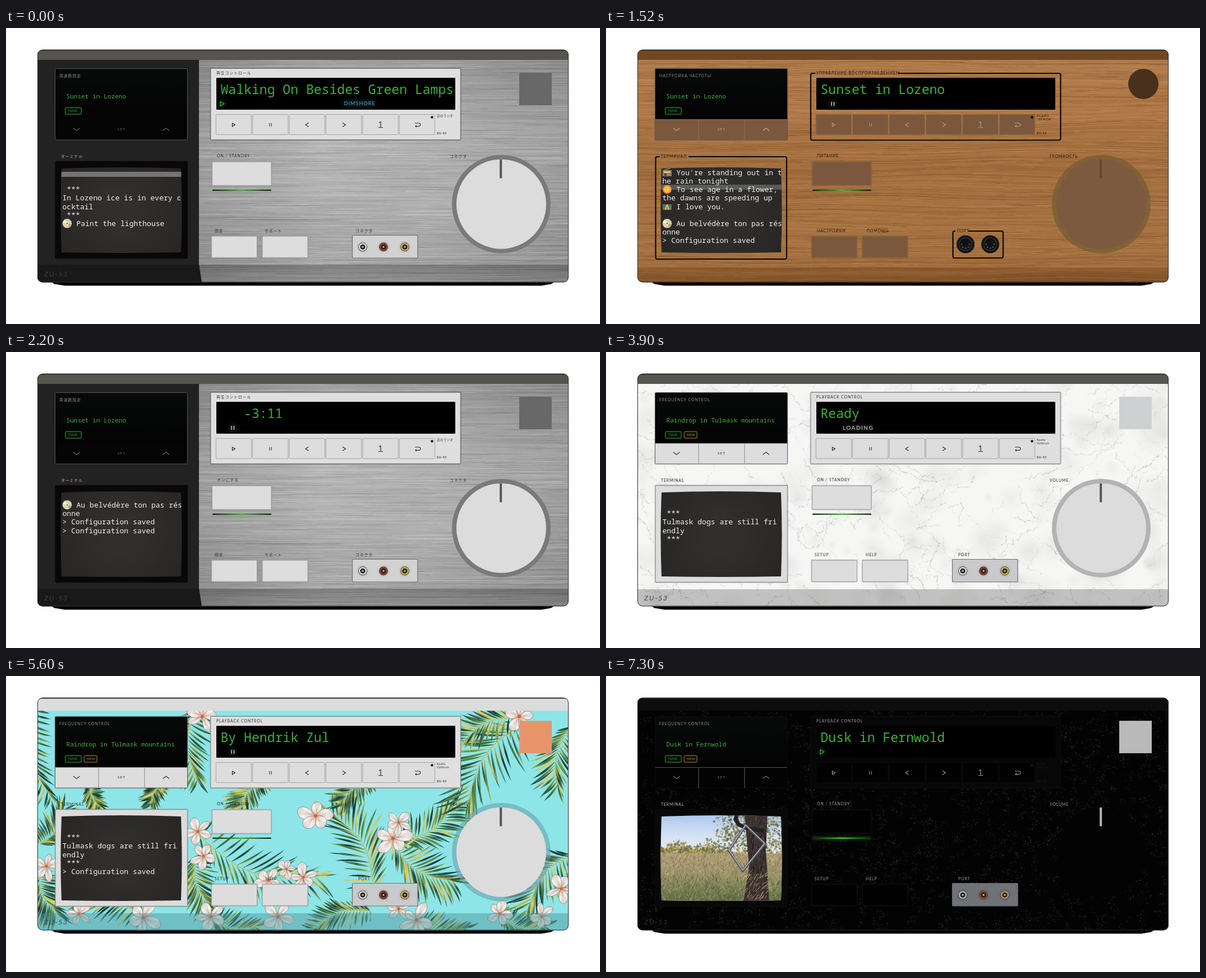
Animation, 1059 px wide and 529 px high, one loop 8000 ms. Source, as an HTML page with a canvas:

```html
<!DOCTYPE html>
<html lang="en">
<head>
<meta charset="utf-8">
<title>Radio skins</title>
<style>
html, body { margin: 0; width: 100%; height: 100%; overflow: hidden; background: #fff; }
canvas { display: block; }
</style>
</head>
<body>
<canvas id="stage" width="1059" height="529"></canvas>
<script>
const stage = document.getElementById('stage');
const screenCtx = stage.getContext('2d');
let c = screenCtx;

const MONO = '"Noto Sans Mono", monospace';
const SANS = 'Lato, "Open Sans", "Noto Sans CJK JP", "Noto Sans CJK", sans-serif';
const MODEL = 'ZU-53';
const GREEN = '#43ad3c';

// ---------- helpers ----------
let seed = 1;
const rnd = (a = 0, b = 1) => {
  seed = (seed * 16807) % 2147483647;
  return a + (b - a) * seed / 2147483647;
};
const pick = list => list[Math.floor(rnd(0, list.length))];

function text(str, x, mid, size, color, font = SANS, spacing = 0, weight = 400) {
  c.font = `${weight} ${size}px ${font}`;
  c.letterSpacing = spacing + 'px';
  c.fillStyle = color;
  c.fillText(str, x, mid + size * 0.36);
}
const mono = (str, x, mid, size, color) => text(str, x, mid, size, color, MONO);
const label = (str, x, mid, color) => text(str, x, mid, 6.9, color, SANS, 0.9);

function box(x, y, r, b, fill, line, width = 1, radius = 1) {
  c.beginPath();
  c.roundRect(x, y, r - x, b - y, radius);
  if (fill) { c.fillStyle = fill; c.fill(); }
  if (line) { c.strokeStyle = line; c.lineWidth = width; c.stroke(); }
}
function disc(x, y, r, fill) {
  c.beginPath();
  c.arc(x, y, r, 0, 7);
  c.fillStyle = fill;
  c.fill();
}
function line(points, color, width = 1) {
  c.beginPath();
  points.forEach(([x, y]) => c.lineTo(x, y));
  c.strokeStyle = color;
  c.lineWidth = width;
  c.stroke();
}
function shape(points, fill) {
  c.beginPath();
  points.forEach(([x, y]) => c.lineTo(x, y));
  c.fillStyle = fill;
  c.fill();
}
function gradient(x0, y0, x1, y1, ...colors) {
  const g = c.createLinearGradient(x0, y0, x1, y1);
  colors.forEach((color, i) => g.addColorStop(i / (colors.length - 1), color));
  return g;
}
function glow(color, blur, draw) {
  c.save();
  c.shadowColor = color;
  c.shadowBlur = blur;
  draw();
  c.restore();
}
// Box with a soft shadow outside only.
function raised(x, y, r, b, fill, rim, width = 1.3) {
  glow('#0006', 2, () => box(x, y, r, b, fill));
  box(x, y, r, b, null, rim, width);
}
// Outline whose top edge is open for a label.
function openFrame(x, y, r, b, gapL, gapR) {
  c.beginPath();
  c.moveTo(gapR, y);
  c.arcTo(r, y, r, b, 3);
  c.arcTo(r, b, x, b, 3);
  c.arcTo(x, b, x, y, 3);
  c.arcTo(x, y, r, y, 3);
  c.lineTo(gapL, y);
  c.strokeStyle = '#0b0806';
  c.lineWidth = 2.2;
  c.stroke();
}

// ---------- surfaces ----------
function streaks(n, x0, x1, y0, y1, minLen, maxLen, colors, maxAlpha) {
  for (let i = 0; i < n; i++) {
    c.globalAlpha = rnd(0.02, maxAlpha);
    c.fillStyle = pick(colors);
    c.fillRect(rnd(x0 - maxLen / 2, x1), rnd(y0, y1), rnd(minLen, maxLen), rnd(0.4, 1));
  }
  c.globalAlpha = 1;
}

function metalSurface() {
  box(56, 39, 1003, 455, gradient(344, 0, 1003, 0, '#929292', '#adadad', '#a8a8a8', '#949494'));
  box(344, 57, 1003, 455, gradient(0, 57, 0, 455, '#0001', '#fff2', '#fff1', '#0000'));
  streaks(7000, 344, 1003, 57, 454, 30, 200, ['#fff', '#444'], 0.13);
  box(340, 423, 1003, 455, gradient(0, 423, 0, 455, '#0004', '#0002'));
  shape([[56, 57], [344, 57], [344, 423], [349, 455], [56, 455]], '#222');
  shape([[56, 423], [344, 423], [349, 455], [56, 455]], '#191919');
}

function woodSurface() {
  box(56, 39, 1003, 455, gradient(0, 57, 0, 455, '#b5804f', '#b07947', '#a6713f', '#ab7745', '#a26c3b'));
  for (let i = 0; i < 480; i++) {
    const y = rnd(52, 460), amp = rnd(1, 5), phase = y / 37;
    const points = [];
    for (let x = 50; x <= 1010; x += 20)
      points.push([x, y + amp * Math.sin(x / 170 + phase) + 2 * Math.sin(x / 67 + phase * 2)]);
    c.globalAlpha = rnd(0.04, 0.24);
    line(points, pick(['#6d4524', '#8a5b31', '#cf9f6a', '#7d5029']), rnd(0.5, 2));
  }
  streaks(4500, 56, 1003, 57, 454, 5, 45, ['#54331a', '#d5a577'], 0.3);
  box(56, 428, 1003, 455, '#54300f55');
}

function marbleSurface() {
  box(56, 39, 1003, 455, '#f6f6f5');
  for (let i = 0; i < 260; i++) {
    const x = rnd(56, 1003), y = rnd(57, 454), r = rnd(8, 36);
    const g = c.createRadialGradient(x, y, 0, x, y, r);
    g.addColorStop(0, '#b4b4b424');
    g.addColorStop(1, '#b4b4b400');
    disc(x, y, r, g);
  }
  for (let i = 0; i < 330; i++) {
    let x = rnd(40, 1010), y = rnd(50, 460), dir = pick([0.6, 0.9, 2.4, -0.5]) + rnd(-0.4, 0.4);
    const alpha = rnd(0.08, 0.45);
    for (let step = rnd(8, 40); step > 0; step--) {
      const from = [x, y], turn = dir + rnd(-1.3, 1.3);
      x += 3 * Math.cos(turn);
      y += 3 * Math.sin(turn);
      c.globalAlpha = alpha * rnd(0.2, 1);
      line([from, [x, y]], '#85858a', rnd(0.4, 2));
    }
  }
  c.globalAlpha = 1;
  box(56, 424, 1003, 455, '#7777776b');
}

function frond([x0, y0, x1, y1, size]) {
  const angle = Math.atan2(y1 - y0, x1 - x0), bend = Math.hypot(x1 - x0, y1 - y0) * 0.15;
  const at = t => {
    const off = bend * Math.sin(Math.PI * t);
    return [x0 + (x1 - x0) * t - off * Math.sin(angle), y0 + (y1 - y0) * t + off * Math.cos(angle)];
  };
  const spine = [];
  for (let t = 0; t <= 1; t += 0.05) {
    const [x, y] = at(t);
    spine.push([x, y]);
    for (const side of [-1, 1]) {
      const length = size * (0.45 + 0.7 * Math.sin(Math.PI * (0.1 + 0.75 * t))) * rnd(0.8, 1.15);
      const droop = side * length * rnd(0.08, 0.2);
      c.save();
      c.translate(x, y);
      c.rotate(angle + side * (1 - 0.7 * t + rnd(-0.08, 0.08)));
      c.beginPath();
      c.moveTo(0, 0);
      c.quadraticCurveTo(length * 0.5, -4.2, length, droop);
      c.quadraticCurveTo(length * 0.45, 3.4, 0, 0);
      c.fillStyle = gradient(0, 0, length, 0, pick(['#cfc658', '#8fa744', '#28644a']),
        pick(['#173f36', '#1d5040', '#4c8240', '#d6cd62']), pick(['#16403a', '#2c6a4c', '#b9bd55']));
      c.fill();
      line([[2, 0], [length * 0.8, droop * 0.6]], pick(['#12372f88', '#e6e29a99']), 0.7);
      c.restore();
    }
  }
  line(spine, '#c2bb55', 1.4);
}

function flower([x, y, size]) {
  const start = rnd(0, 6);
  for (let i = 0; i < 5; i++) {
    const reach = size * rnd(0.85, 1.2), width = size * rnd(0.32, 0.55);
    c.save();
    c.translate(x, y);
    c.rotate(start + i * Math.PI * 0.4 + rnd(-0.2, 0.2));
    c.beginPath();
    c.moveTo(0, 0);
    c.bezierCurveTo(reach * 0.3, -width, reach * 0.9, -width, reach, 0);
    c.bezierCurveTo(reach * 0.9, width * 0.8, reach * 0.4, width * 0.7, 0, 0);
    c.fillStyle = gradient(0, 0, reach, 0, '#d78f6c', '#eee4de', '#f7f3f0', '#dcd3cf');
    c.fill();
    c.strokeStyle = '#8d7972';
    c.lineWidth = 0.7;
    c.stroke();
    for (const k of [-0.5, -0.25, 0, 0.25]) line([[size * 0.25, 0], [reach * 0.9, k * width]], '#a3918b88', 0.7);
    c.restore();
  }
  disc(x, y, size * 0.1, '#c4663a');
}

function tropicSurface() {
  box(56, 39, 1003, 455, '#8de5e8');
  [[340, 60, 345, 190, 45], [50, 60, 85, 220, 40], [60, 300, 100, 240, 40], [60, 350, 90, 420, 45],
   [345, 285, 560, 355, 58], [655, 385, 578, 245, 58], [695, 295, 800, 225, 45], [690, 300, 800, 365, 52],
   [925, 85, 825, 230, 70], [915, 75, 815, 120, 42], [1010, 90, 985, 200, 45], [1010, 320, 935, 410, 55],
   [650, 420, 550, 455, 35], [245, 430, 130, 410, 40], [730, 435, 820, 450, 35], [340, 320, 365, 410, 42],
   [460, 185, 420, 238, 35], [650, 185, 600, 232, 35], [360, 430, 450, 445, 35], [880, 430, 960, 445, 35],
   [280, 190, 260, 230, 25], [150, 190, 170, 235, 25]].forEach(frond);
  [[552, 250, 29], [690, 290, 31], [700, 262, 22], [342, 278, 26], [352, 322, 24], [350, 72, 26],
   [915, 72, 28], [945, 103, 24], [468, 365, 24], [530, 360, 24], [500, 345, 18], [245, 432, 30],
   [365, 430, 27], [485, 430, 30], [700, 416, 24], [732, 436, 30], [880, 425, 24], [990, 380, 25],
   [955, 430, 22], [130, 425, 23], [72, 340, 24]].forEach(flower);
  box(56, 424, 1003, 455, '#4d959c77');
}

function darkSurface() {
  box(56, 39, 1003, 455, '#030303');
  for (let i = 0; i < 1500; i++) {
    const x = rnd(56, 1003), y = rnd(62, 454);
    for (let k = 0; k < 9; k++) {
      c.fillStyle = `rgba(80,80,80,${rnd(0.1, 0.45)})`;
      c.fillRect(x + rnd(-6, 6), y + rnd(-6, 6), rnd(0.7, 2.2), rnd(0.7, 2.2));
    }
  }
}

// ---------- skins ----------
const english = {
  freq: 'FREQUENCY CONTROL', play: 'PLAYBACK CONTROL', term: 'TERMINAL', power: 'ON / STANDBY',
  setup: 'SETUP', help: 'HELP', port: 'PORT', volume: 'VOLUME', radio: ['Radio', 'Volbrun']
};
const japanese = {
  freq: '周波数設定', play: '再生コントロール', term: 'ターミナル', power: 'オンにする',
  setup: '設定', help: 'サポート', port: 'コネクタ', volume: 'コネクタ', radio: ['苔のラジオ']
};
const russian = {
  freq: 'НАСТРОЙКА ЧАСТОТЫ', play: 'УПРАВЛЕНИЕ ВОСПРОИЗВЕДЕНИЕМ', term: 'ТЕРМИНАЛ', power: 'ПИТАНИЕ',
  setup: 'НАСТРОЙКИ', help: 'ПОМОЩЬ', port: 'ПОРТ', volume: 'ГРОМКОСТЬ', radio: ['РАДИО', '"ЛУЖОК"']
};
const light = {
  words: english, top: '#565652', topEnd: 57, panel: '#dfdfdf', button: '#dddddd', edge: '#a2a4a6',
  rim: '#8d9092', icon: '#2a2a2a', ink: '#303030', termInk: '#303030', knob: '#dcdcdc', ring: '#b3b3b3',
  mark: '#555', logo: '#cfd0d1', model: '#444', freqButton: '#dddddd', freqLine: '#999', freqIcon: '#333',
  bezel: '#dcdcdc', port: '#c9cacc'
};
const skins = {
  metal: { ...light, surface: metalSurface, words: japanese, top: '#55544f', ring: '#7a7a7a', logo: '#686868',
    termInk: '#b5b5b5', model: '#3d3d3d', freqButton: '#040404', freqLine: null, freqIcon: '#686868',
    bezel: '#080808', port: '#d2d2d2', rim: '#6d6d6d' },
  wood: { ...light, surface: woodSurface, words: russian, top: '#704723', panel: null, button: '#7b583d',
    edge: '#8f673f', rim: '#8f673f', icon: '#b99b80', ink: '#24160b', termInk: '#24160b', knob: '#7c593f',
    ring: '#7b5e35d0', mark: '#65452f', logo: '#49301c', model: null, freqButton: '#7b583d',
    freqLine: '#906a4a', freqIcon: '#c3a68c', bezel: null },
  marble: { ...light, surface: marbleSurface },
  tropic: { ...light, surface: tropicSurface, top: '#dcdcdc', topEnd: 62, ring: '#699fa690', logo: '#e8946a',
    model: '#2f5055' },
  dark: { ...light, surface: darkSurface, top: '#0d0d0d', topEnd: 62, panel: '#070707', button: '#020202',
    edge: '#0d0d0d', rim: '#0c0c0c', icon: '#999', ink: '#9a9a9a', termInk: '#c4c4c4', knob: '#030303',
    ring: null, mark: '#b5b5b5', logo: '#b9b9b9', model: '#333', freqButton: '#030303', freqLine: '#555',
    freqIcon: '#777', bezel: '#080808', port: '#6f7277' }
};

// ---------- radio parts ----------
function cabinet(s) {
  shape([[80, 453], [86, 457.5], [105, 460.5], [955, 460.5], [972, 457.5], [979, 453]], '#000');
  c.save();
  c.beginPath();
  c.roundRect(56, 39, 947, 415.5, 9);
  c.clip();
  seed = 4242;
  s.surface();
  box(56, 39, 1003, s.topEnd, s.top, null, 0, 0);
  box(56, 38, 1003, 40.5, '#303030', null, 0, 0);
  c.restore();
  box(56.5, 39, 1002.5, 454, null, '#2b2b2b', 1, 9);
  if (s.model) {
    c.save();
    c.transform(1, 0, -0.12, 1, 53, 0);
    text(MODEL, 68, 440, 11.5, s.model, SANS, 1.9);
    c.restore();
  }
  if (s === skins.wood) disc(958, 100, 27, s.logo);
  else box(915, 80, 973, 138, s.logo, null, 0, 0);
}

function tag(str, x, r, color) {
  glow(color, 3, () => box(x, 142.5, r, 154, '#061006'));
  box(x, 142.5, r, 154, null, color);
  text(str, x + 4.5, 148.2, 5.4, color, SANS, 0.6, 700);
}

function tuner(s, state) {
  raised(87.5, 72.5, 323.5, 200, s.freqButton, s === skins.dark ? '#0c0c0c' : '#55585a', 1);
  box(88, 73, 323, 163, gradient(0, 73, 0, 163, '#080909', '#020302'));
  if (s.freqLine) {
    line([[88, 163.5], [323, 163.5]], s.freqLine);
    for (const x of [165, 247]) line([[x, 163], [x, 200]], s.freqLine, 1.2);
  }
  label(s.words.freq, 95, 86, '#8b8b8b');
  mono(state.station, 107.5, 122, 11.12, GREEN);
  tag('TUNE', 106, 134, '#367f3b');
  if (state.fresh) tag('NEW', 139.5, 162, '#93672f');
  line([[120, 179], [125.7, 183.5], [131.4, 179]], s.freqIcon, 1.2);
  line([[279.5, 183.5], [285.2, 179], [291, 183.5]], s.freqIcon, 1.2);
  text('SET', 199, 181, 6.5, s.freqIcon, SANS, 1);
}

function player(s, state) {
  if (s.panel) raised(364.8, 72, 810.5, 200, s.panel, s.rim);
  else openFrame(365, 81, 810.5, 200.5, 373, 521);
  label(s.words.play, 375, 81, s.ink);
  box(375, 89, 801, 146, '#000');
  c.save();
  c.beginPath();
  c.rect(375, 89, 424, 57);
  c.clip();
  mono(state.title, 382.5, 109.8, 23.1, GREEN);
  c.restore();
  if (state.mode === 'play') glow('#3fd03f', 8, () =>
    line([[382, 131.5], [389, 135.5], [382, 139.5], [382, 131.5]], GREEN, 1.2));
  if (state.mode === 'pause') glow('#fff', 10, () => {
    for (const x of [402, 406.5]) line([[x, 132], [x, 139]], '#ddd', 1.3);
  });
  if (state.mode === 'loading') glow('#fff9', 7, () => text('LOADING', 422, 135.5, 10, '#c9c9c9', SANS, 1.5));
  if (state.badge) glow('#1f9fc4', 9, () => text(state.badge, 602.5, 135, 9, '#55a9bd', SANS, 1.1));

  for (let i = 0; i < 6; i++) box(374.3 + i * 65.4, 154.5, 437.6 + i * 65.4, 190.5, s.button, s.edge);
  const ink = s.icon;
  line([[403.5, 170], [408.5, 173], [403.5, 176], [403.5, 169.5]], ink, 1.2);
  for (const x of [470, 473.3]) line([[x, 170], [x, 176]], ink);
  line([[539.5, 169.5], [534, 173], [539.5, 176.5]], ink, 1.2);
  line([[600, 169.5], [605.5, 173], [600, 176.5]], ink, 1.2);
  line([[665, 169.5], [668, 167.5], [668, 177.5]], ink, 1.2);
  line([[663.5, 177.8], [672, 177.8]], ink);
  line([[729, 170], [736, 170], [738.5, 171], [739, 173], [738, 175], [736, 175.6], [730, 175.6]], ink, 1.1);
  line([[732, 173.5], [729.5, 175.6], [732, 177.7]], ink);
  const small = s === skins.dark ? '#202020' : s.ink;
  disc(759.5, 159.5, 2.2, s === skins.dark ? '#171717' : '#080808');
  s.words.radio.forEach((str, i) => text(str, 768, 157.5 + i * 6, 5.4, small, SANS, 0.5));
  text(MODEL, 768, 187.8, 5, small, SANS, 0.7, 700);
}

function screenPath() {
  c.beginPath();
  c.moveTo(99, 251);
  c.quadraticCurveTo(206, 247, 312, 251);
  c.quadraticCurveTo(315, 326, 312, 401);
  c.quadraticCurveTo(206, 403, 99, 401);
  c.quadraticCurveTo(96, 326, 99, 251);
}

const icons = {
  disc(x, y) {
    disc(x, y, 8.3, '#d9cfaa');
    shape([[x, y], [x - 8, y - 2], [x - 4, y - 7]], '#f5f2dd');
    shape([[x, y], [x + 8, y + 2], [x + 4, y + 7]], '#b3a463');
    disc(x, y, 2.6, '#f5f5ee');
    disc(x, y, 1.2, '#444');
  },
  radio(x, y) {
    box(x - 8, y - 4, x + 8, y + 7, '#96814f');
    box(x - 6, y - 2, x + 6, y + 1, '#d5c68c');
    disc(x - 3, y + 4, 2.3, '#4b3d25');
    line([[x - 6, y - 4], [x + 5, y - 7]], '#aaa');
  },
  sun(x, y) { disc(x, y, 8, '#e98b2c'); disc(x, y, 5.5, '#f6c24c'); },
  track(x, y) {
    box(x - 8, y - 4, x + 8, y + 6, '#557849');
    shape([[x - 1, y - 4], [x + 1, y - 4], [x + 6, y + 6], [x - 6, y + 6]], '#9c8060');
    line([[x, y - 3], [x - 3, y + 6]], '#ddd');
    line([[x, y - 3], [x + 3, y + 6]], '#ddd');
  }
};

function landscape() {
  seed = 77;
  box(95, 245, 316, 405, gradient(0, 249, 0, 320, '#adc9ef', '#d3e1f3', '#e9ecea'));
  // Tree line, thick on the right and low on the left.
  c.globalAlpha = 0.6;
  for (let i = 0; i < 2200; i++) {
    const x = rnd(95, 316), right = x > 205 + rnd(-15, 15);
    disc(x, right ? rnd(246, 320) : 320 - rnd(0, 24 + 7 * Math.sin(x / 9)) * rnd(0.4, 1), rnd(0.6, 2.2),
      pick(right ? ['#8f8244', '#6a6638', '#b39d4c', '#4a4d2c', '#5d5b34'] : ['#c8ad4a', '#948246', '#6b7050', '#5f6243']));
  }
  c.globalAlpha = 1;
  box(95, 317, 316, 405, gradient(0, 317, 0, 402, '#b3a078', '#989068', '#5f6b41'));
  for (let i = 0; i < 1900; i++) {
    const x = rnd(95, 316), y = rnd(318, 405);
    line([[x, y], [x + rnd(-4, 6), y - rnd(2, 8)]],
      pick(y > 360 ? ['#83905a', '#46532f', '#a5a67c', '#66753f'] : ['#cbb994', '#85795a', '#ab996f', '#74724c']), 0.7);
  }
  shape([[247, 247], [288, 247], [285, 310], [291, 404], [245, 404], [255, 340]], '#3a302f');
  for (let i = 0; i < 180; i++) {
    const x = rnd(254, 283), y = rnd(249, 398);
    line([[x, y], [x + rnd(-2, 2), y + rnd(3, 10)]], pick(['#221d1f', '#574a45', '#4b403d']), 1.2);
  }
  line([[234, 246], [231, 256], [236, 265], [250, 272], [282, 277]], '#202125', 7);
  line([[249, 267], [283, 300], [244, 348], [219, 312], [249, 267]], '#50565b', 4.5);
  line([[249, 266], [283, 299], [244, 347], [219, 311], [249, 266]], '#aeb5b9', 1.6);
  for (let i = 0; i < 80; i++) {
    const x = rnd(242, 296), y = rnd(350, 401);
    line([[x, y], [x + rnd(2, 9), y - rnd(3, 9)]], pick(['#c7aa82', '#a4815f', '#7c8050']), 1);
  }
}

function terminal(s, state) {
  if (s.bezel) raised(88, 238.5, 323.5, 411.5, s.bezel, s.bezel === '#080808' ? '#0b0b0b' : s.rim);
  else openFrame(88.5, 230, 322, 413, 96, 147);
  label(s.words.term, 98, 230, s.termInk);
  c.save();
  screenPath();
  c.clip();
  const g = c.createRadialGradient(206, 326, 30, 206, 326, 145);
  g.addColorStop(0, '#302f2d');
  g.addColorStop(1, '#262524');
  box(95, 245, 316, 405, g);
  if (state.photo) landscape();
  if (state.scan) box(95, state.scan, 316, state.scan + 9, state.scan > 270 ? '#777777a0' : '#747474', null, 0, 0);
  (state.lines || []).forEach((entry, row) => {
    const [str, icon] = [].concat(entry), y = 258 + row * 15.22;
    if (icon) icons[icon](109, y);
    mono(str, icon ? 125.5 : 100.5, y, 13.08, '#f0f0ee');
  });
  c.restore();
}

function jack(x, color) {
  disc(x, 391.3, 11, '#0000000c');
  disc(x, 391.3, 8, '#4a4038');
  disc(x, 391.3, 7, color);
  disc(x, 391.3, 4.6, '#252321');
  disc(x, 391.3, 1.7, '#b8b4ac');
}

function controls(s, state) {
  const w = s.words, wood = s === skins.wood, dark = s === skins.dark;
  label(state.power || w.power, 376, 229, s.ink);
  label(w.setup, wood ? 376 : 372, 363, s.ink);
  label(w.help, wood ? 465 : s === skins.metal ? 461 : 463, 363, s.ink);
  label(w.volume, 791, 229.5, s.ink);
  const key = (...area) => raised(...area, s.button, dark ? '#0e0e0e' : s.edge);
  key(367.5, 239, 473, 281.5);
  key(366.5, 372, 447.5, 410.5);
  key(457, 372, 538, 410.5);

  const led = gradient(368, 0, 473, 0, '#0b200b', dark ? '#43cf30' : '#4caf37', '#0b200b');
  glow(dark ? '#35e025a0' : '#0000', 5, () => box(368, 288.7, 473, 291, led));

  if (wood) {
    openFrame(618.5, 363, 708, 411, 623, 646);
    label(w.port, 625.5, 363, s.ink);
    for (const x of [641, 685]) {
      disc(x, 386.5, 16, '#111112');
      c.beginPath();
      c.arc(x, 386.5, 11.5, 0, 7);
      c.strokeStyle = '#343436';
      c.lineWidth = 1.5;
      c.stroke();
      for (let i = 0; i < 5; i++) disc(x + 7 * Math.cos(i * Math.PI / 4), 386.5 + 7 * Math.sin(i * Math.PI / 4), 1.5, '#4d4d50');
    }
  } else {
    label(w.port, s === skins.metal ? 623 : 628, 363, s.ink);
    box(617.5, 370.5, 734, 411, s.port, '#6e7072', 1.2);
    jack(636, dark ? '#b5b5b5' : '#dedede');
    jack(673, '#8f3f30');
    jack(711, dark ? '#b39f45' : '#cfb944');
  }

  if (s.ring) disc(883, 314.7, 88, s.ring);
  disc(883, 314.7, 80, s.knob);
  line([[882.2, 235], [882.2, 268.5]], s.mark, 4);
}

// ---------- timeline ----------
const SAVED = '> Configuration saved';
const dogs = ['', '', ' ***', 'Tulmask dogs are still fri', 'endly', ' ***'];
const states = [
  { at: 0, skin: 'metal', station: 'Sunset in Lozeno', title: 'Walking On Besides Green Lamps', mode: 'play',
    badge: 'DIMSHORE', power: 'ON / STANDBY', scan: 257,
    lines: ['', '', ' ***', 'In Lozeno ice is in every c', 'ocktail', ' ***', ['Paint the lighthouse', 'disc']] },
  { at: 500, skin: 'wood', station: 'Sunset in Lozeno', title: 'Sunset in Lozeno', mode: 'pause', scan: 280,
    lines: [["You're standing out in t", 'radio'], 'he rain tonight', ['To see age in a flower,', 'sun'],
      'the dawns are speeding up', ['I love you.', 'track'], '', ['Au belvédère ton pas rés', 'disc'], 'onne', SAVED] },
  { at: 2200, skin: 'metal', station: 'Sunset in Lozeno', title: '   -3:11', mode: 'pause',
    lines: ['', ['Au belvédère ton pas rés', 'disc'], 'onne', SAVED, SAVED] },
  { at: 3900, skin: 'marble', station: 'Raindrop in Tulmask mountains', fresh: true, title: 'Ready',
    mode: 'loading', lines: dogs },
  { at: 5600, skin: 'tropic', station: 'Raindrop in Tulmask mountains', fresh: true, title: 'By Hendrik Zul',
    mode: 'pause', lines: [...dogs, SAVED] },
  { at: 7300, skin: 'dark', station: 'Dusk in Fernwold', fresh: true, title: 'Dusk in Fernwold',
    mode: 'play', photo: true }
];

function render(state) {
  const picture = document.createElement('canvas');
  picture.width = stage.width;
  picture.height = stage.height;
  c = picture.getContext('2d');
  c.fillStyle = '#fff';
  c.fillRect(0, 0, stage.width, stage.height);
  const skin = skins[state.skin];
  [cabinet, tuner, player, terminal, controls].forEach(part => part(skin, state));
  return picture;
}

const pictures = states.map(render);
const start = performance.now();
function tick() {
  const t = Math.max(0, performance.now() - start) % 8000;
  screenCtx.drawImage(pictures[states.findLastIndex(state => state.at <= t)], 0, 0);
  requestAnimationFrame(tick);
}
tick();
</script>
</body>
</html>
```
